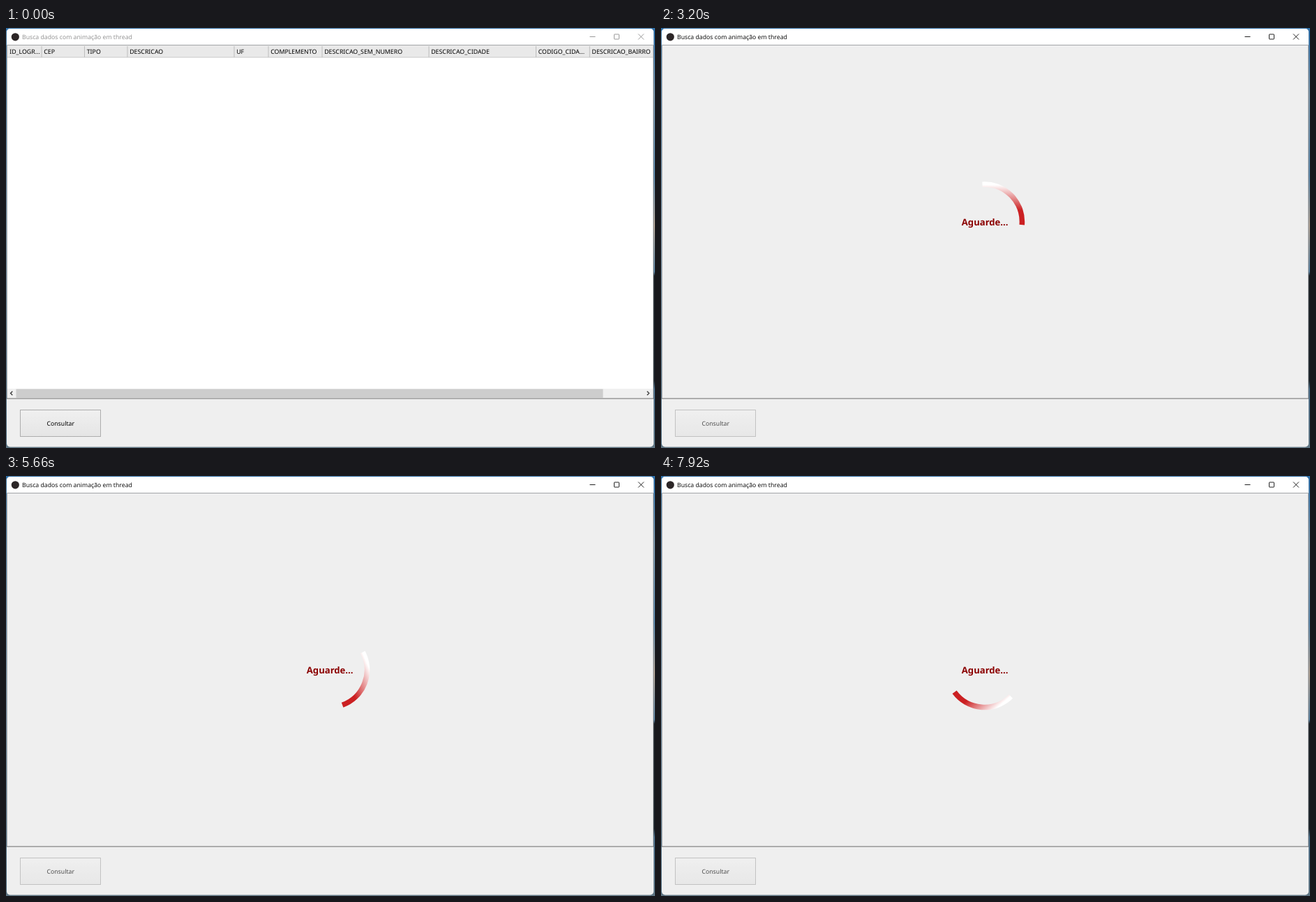
An HTML page for the animation above (8 s loop, 930x602 px).

```html
<!DOCTYPE html>
<html lang="pt">
<head>
<meta charset="utf-8">
<style>
  html, body { margin: 0; width: 100%; height: 100%; overflow: hidden; }
  svg { display: block; width: 930px; height: 602px; }
  text { font: 8.7px "Noto Sans", "Open Sans", sans-serif; text-rendering: geometricPrecision; }
  #headers text { font-size: 8.8px; }
</style>
</head>
<body>
<svg viewBox="0 0 930 602">
  <defs>
    <linearGradient id="desktop" x2="0" y2="1">
      <stop offset="0" stop-color="#2f6ea6"/>
      <stop offset=".16" stop-color="#7890a2"/>
      <stop offset=".35" stop-color="#5c84a4"/>
      <stop offset=".47" stop-color="#a89c90"/>
      <stop offset=".58" stop-color="#5b7f9b"/>
      <stop offset=".59" stop-color="#22272c"/>
      <stop offset=".84" stop-color="#20282e"/>
      <stop offset=".86" stop-color="#4d6d86"/>
      <stop offset="1" stop-color="#5e7482"/>
    </linearGradient>
    <linearGradient id="edge" x2="0" y2="1">
      <stop offset="0" stop-color="#3d749f"/>
      <stop offset=".5" stop-color="#7790a3"/>
      <stop offset="1" stop-color="#456478"/>
    </linearGradient>
    <linearGradient id="normal" x2="0" y2="1"><stop stop-color="#f0f0f0"/><stop offset="1" stop-color="#e5e5e5"/></linearGradient>
    <linearGradient id="hover" x2="0" y2="1"><stop stop-color="#ecf4fc"/><stop offset="1" stop-color="#dcecfc"/></linearGradient>
    <linearGradient id="pressed" x2="0" y2="1"><stop stop-color="#daecfc"/><stop offset="1" stop-color="#c4e0fc"/></linearGradient>
    <linearGradient id="tail" gradientUnits="userSpaceOnUse" x1="0" y1="-53" x2="0" y2="-17">
      <stop offset="0" stop-color="#fff"/><stop offset="1" stop-color="#cb2022"/>
    </linearGradient>
  </defs>

  <rect width="930" height="602" fill="url(#desktop)"/>
  <rect width="4" height="602" fill="url(#edge)"/>
  <rect width="930" height="4" fill="#2f6ea6"/>
  <rect y="598" width="926" height="4" fill="#5e7482"/>
  <rect x="1" y="1" width="927" height="599.5" rx="5" fill="#efefef"/>
  <path d="M1 24.5V6a5 5 0 0 1 5-5H923a5 5 0 0 1 5 5V24.5Z" fill="#fff"/>
  <circle cx="13.3" cy="12.8" r="5.6" fill="#2c2627"/>
  <text id="title" x="23" y="16">Busca dados com animação em thread</text>
  <path id="controls" fill="none" d="M836.5 12.5h8M871.5 9.5q0-.5 .5-.5h6q.5 0 .5 .5v6q0 .5-.5 .5h-6q-.5 0-.5-.5ZM906 8.5l8 8M914 8.5l-8 8"/>

  <g id="grid">
    <rect x="1.5" y="25" width="926" height="506" fill="#fff"/>
    <rect x="1.5" y="25" width="926" height="17" fill="#e9e9e9"/>
    <path d="M1.5 42h926" stroke="#c9c9c9"/>
    <g id="headers"></g>
    <rect x="1.5" y="517" width="926" height="13.5" fill="#f0f0f0"/>
    <rect x="14.5" y="517.5" width="841" height="12.5" fill="#cdcdcd"/>
    <path d="M9.3 520.8l-2.8 2.7 2.8 2.7M918.7 520.8l2.8 2.7-2.8 2.7" fill="none" stroke="#333" stroke-width="1.3"/>
  </g>
  <path d="M1.5 531V24.5H927.5V531" fill="none" stroke="#a3a5a8"/>
  <path d="M1 531.2H928" stroke="#858585" stroke-width="1.3"/>

  <g id="button">
    <rect id="face" x="20.5" y="547.5" width="115" height="38"/>
    <text x="58.5" y="570.4">Consultar</text>
  </g>

  <g id="wait">
    <g id="spinner"><path id="arc" fill="none" stroke="url(#tail)" stroke-width="7.6"/></g>
    <text x="464.2" y="283" text-anchor="middle" fill="#8b0000" style="font-size:13.1px;font-weight:700">Aguarde...</text>
  </g>
  <path id="cursor" d="M0 0V12l2.8-2.5 2.1 4.6 2-.9-2-4.4H8.8Z" fill="#fff" stroke="#3b2930" stroke-width=".9" stroke-linejoin="round"/>
</svg>
<script>
const LOOP = 8000, PRESS = 1950, WAIT = 2100, CURSOR_IN = 460, CURSOR_STOP = 1020, CURSOR_OUT = 2930;
const TURN = 1030, TURN_START = 69, RADIUS = 53.7;
// Anchors of the screen refresh; each span is divided into steps of about 69 ms.
const REFRESH = [0, 460, 1020, 1950, 2170, 3200, 4520, 5660, 6620, 7920, LOOP];

const el = id => document.getElementById(id);
const set = (id, attrs) => { for (const k in attrs) el(id).setAttribute(k, attrs[k]); };
const show = (id, on) => set(id, { visibility: on ? "visible" : "hidden" });

const columns = [[2, "ID_LOGR..."], [51, "CEP"], [112.5, "TIPO"], [174, "DESCRICAO"], [327, "UF"],
  [376, "COMPLEMENTO"], [453, "DESCRICAO_SEM_NUMERO"], [606, "DESCRICAO_CIDADE"],
  [759.5, "CODIGO_CIDA..."], [836.3, "DESCRICAO_BAIRRO"]];
el("headers").innerHTML = columns.map(([x, name], i) =>
  (i ? `<path d="M${x} 26V42" stroke="#bdbdbd"/>` : "") + `<text x="${x + 3.2}" y="37.4">${name}</text>`).join("");

const point = deg => {
  const a = deg * Math.PI / 180;
  return `${RADIUS * Math.sin(a)} ${-RADIUS * Math.cos(a)}`;
};
set("arc", { d: `M${point(-4)}A${RADIUS} ${RADIUS} 0 0 1 ${point(94)}` });

function refreshTime(t) {
  const i = REFRESH.findIndex(limit => limit > t);
  const start = REFRESH[i - 1], span = REFRESH[i] - start;
  const step = span / Math.round(span / 68.6);
  return start + Math.floor((t - start) / step + 1e-6) * step;
}

function draw(now) {
  const t = refreshTime(now % LOOP);
  const active = t >= PRESS, waiting = t >= WAIT;

  set("title", { fill: active ? "#111" : "#959595" });
  set("controls", { stroke: active ? "#222" : "#999" });
  show("grid", !waiting);
  show("wait", waiting);

  const move = Math.min(1, Math.max(0, (t - CURSOR_IN + 70) / (CURSOR_STOP - CURSOR_IN + 70)));
  const x = 103 + 75 * (1 - move) ** 2;
  show("cursor", t >= CURSOR_IN && t < CURSOR_OUT);
  set("cursor", { transform: `translate(${x} 566.5)` });

  const [fill, stroke] = waiting || t < CURSOR_IN || x > 135 ? ["normal", "#adadad"]
    : active ? ["pressed", "#569de5"] : ["hover", "#7eb4ea"];
  set("face", { fill: `url(#${fill})`, stroke });
  set("button", { opacity: waiting ? 0.67 : 1 });

  // Each turn accelerates from rest.
  const turn = t < 2129 ? 0 : ((t - TURN_START) / TURN) % 1;
  set("spinner", { transform: `translate(463.7 277.8) rotate(${360 * turn * turn})` });
}

function tick() {
  draw(performance.now());
  requestAnimationFrame(tick);
}
tick();
</script>
</body>
</html>
```
